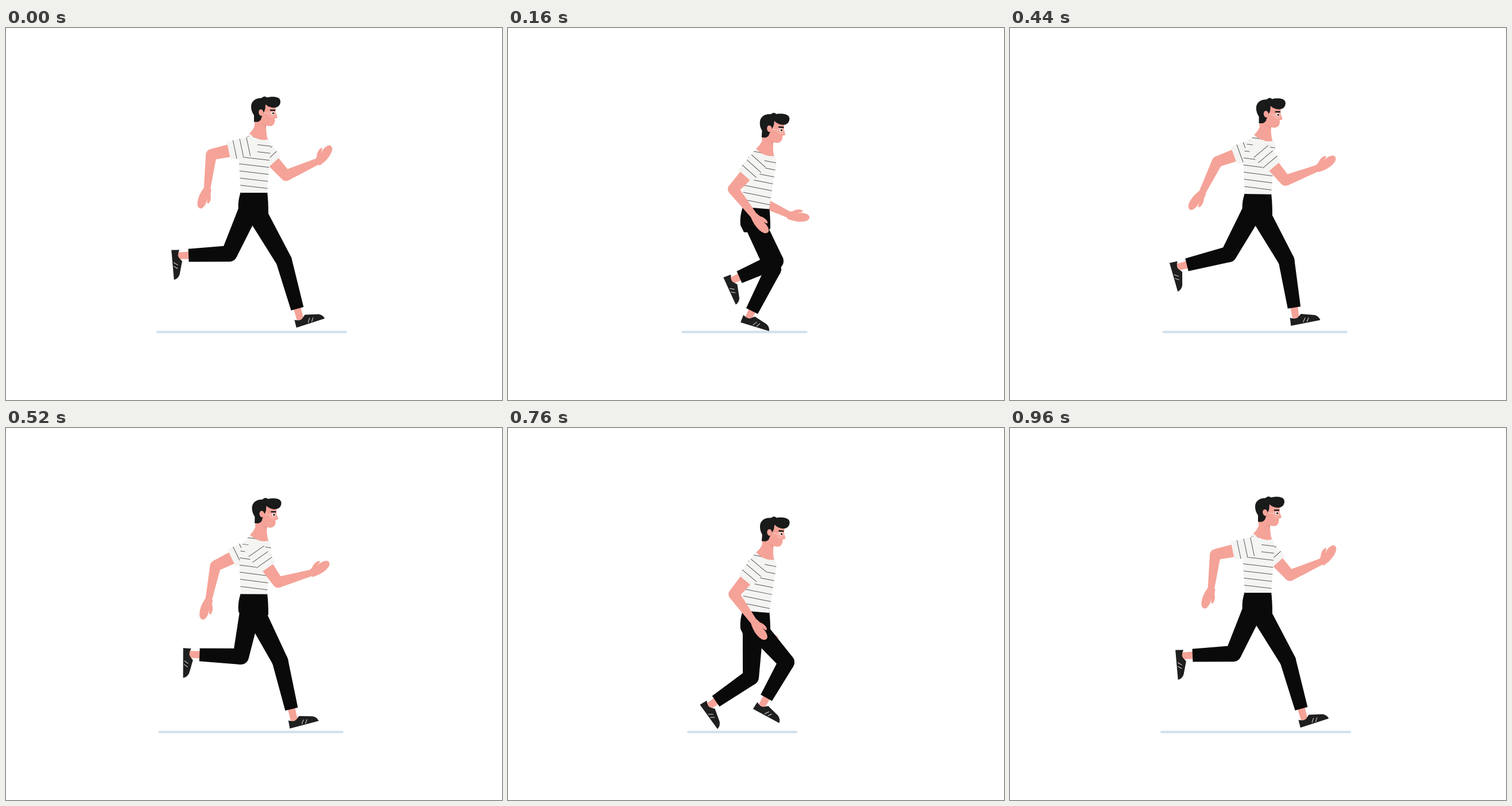
These frames come from a looping animation (864 by 648 pixels, 1 s). An HTML page with a canvas:

```html
<!DOCTYPE html>
<html lang="en">
<head>
<meta charset="utf-8">
<title>Runner</title>
<style>
  html, body { margin: 0; width: 100%; height: 100%; overflow: hidden; background: #fff; }
  canvas { display: block; width: 864px; height: 648px; }
</style>
</head>
<body>
<canvas id="stage"></canvas>
<script>
const W = 864, H = 648, LOOP = 1000, STEP = 40, CYCLE = 960;
const SKIN = '#f5a398', SHADE = '#e08e84', PANTS = '#0a0a0a', HAIR = '#191a1a',
      SHOE = '#1e1f1e', SHIRT = '#f4f4f2', STRIPE = '#55585a', GROUND = '#cfe0ec';

const canvas = document.getElementById('stage');
const ctx = canvas.getContext('2d');
const ratio = window.devicePixelRatio || 1;
canvas.width = W * ratio;
canvas.height = H * ratio;

// time, knee x, knee y, trouser end x, y, foot angle, ankle length
const LEG = [
  [0, 484, 405, 507.5, 489, -18, 19],
  [120, 459, 412, 444.5, 490.5, 8, 18],
  [160, 462, 420, 425, 493, 17, 13],
  [280, 423, 434, 362, 476, 54, 14],
  [320, 408.5, 425, 344.5, 464, 59, 15],
  [440, 381, 394, 308, 412.5, 74, 16],
  [480, 389, 393, 318, 396, 85, 17],
  [600, 457, 410, 385.5, 420.5, 81, 14],
  [640, 466, 406, 403, 434, 65.5, 13.5],
  [760, 485, 408, 450, 470, 28.5, 16],
  [800, 484, 406, 460.5, 475.5, 20, 14],
  [920, 481.5, 405, 495, 487, -11, 18]
];

// time, upper arm angle, upper arm length, forearm angle, hand angle
const NEAR_ARM = [
  [0, 168, 74, 97, 115],
  [160, 132, 66, 52, 53],
  [320, 67, 69, -8, -33],
  [440, 50, 76, -21, -31],
  [600, 71, 72, -1, -20],
  [760, 130, 67, 54, 58]
];
const FAR_ARM = [
  [0, 48, 74, -24, -49],
  [160, 98, 71, 25, 9],
  [320, 152, 79, 95, 107],
  [440, 160, 83, 116, 131],
  [600, 142, 79, 81, 82],
  [760, 105, 69, 70, 40]
];

// time, lean in degrees
const LEAN = [[0, 0], [120, 3.5], [160, 4.5], [280, 4.6], [320, 3.2], [440, 0.7]];

const PELVIS = new Path2D('M409 -2C405 10 404 20 405 30L411 42H440L457 36Q457 14 455 -2Z');
const TORSO = new Path2D('M424 184Q440 196 456 193Q461 199 461 208L458 245L455 287H409L406 237Q406 208 412 199Z');
const NECK = new Path2D('M433 158V171Q430 178 424 184Q439 198 456 194Q453 184 453 168L450 155Z');
const NECK_SHADE = new Path2D('M445 166Q452 171 453 176L453 169Z');
const FACE = new Path2D('M440 135L452 131L470 138L469.500 146L473 155.500Q472 157.500 468 157.500L468.500 162Q467 171 459.500 171Q450 171 444 164Z');
const HAIR_SHAPE = new Path2D('M432 163.500L432 152Q427 145 427 137C427 128 434 122 445 122' +
  'Q450 117 454.500 121C462 119 478 118 478 128C478 137 470 140 463 138.500Q456 137 452 133' +
  'L451.500 141L448 150L445 156Q445 161 439 163.500Z');
const HAND = new Path2D('M-6 -6L2 -8C8 -13 16 -14 19 -11.500C20.500 -9 15 -8 12 -6' +
  'C18 -8.500 26 -8.500 31 -5C34 -2 32 3 28 5C18 10 4 9 -6 6Z');
const SHOE_SHAPE = new Path2D('M0 0L1 -14Q11 -8 16 -13L21 -17L44 -10.500Q51 -7 52 0Z');
const LACES = new Path2D('M27 -9L22 -2M33 -8L28.500 -1.500');

const rad = deg => deg * Math.PI / 180;
const polar = (p, deg, len) => [p[0] + Math.cos(rad(deg)) * len, p[1] + Math.sin(rad(deg)) * len];

// Smooth periodic interpolation through rows of [time, ...values].
function sample(rows, time, period) {
  const n = rows.length;
  const t = ((time % period) + period) % period;
  let i = n - 1;
  while (rows[i][0] > t) i--;
  const at = k => rows[(k + n) % n];
  const when = k => at(k)[0] + Math.floor(k / n) * period;
  const slope = (k, c) => {
    const h0 = when(k) - when(k - 1), h1 = when(k + 1) - when(k);
    const d0 = (at(k)[c] - at(k - 1)[c]) / h0, d1 = (at(k + 1)[c] - at(k)[c]) / h1;
    return (d0 * h1 + d1 * h0) / (h0 + h1);
  };
  const h = when(i + 1) - when(i), u = (t - when(i)) / h, v = 1 - u;
  return rows[0].slice(1).map((_, j) => {
    const c = j + 1;
    return (1 + 2 * u) * v * v * at(i)[c] + u * v * v * h * slope(i, c) +
           u * u * (3 - 2 * u) * at(i + 1)[c] - u * u * v * h * slope(i + 1, c);
  });
}

function fill(path, color) {
  ctx.fillStyle = color;
  ctx.fill(path);
}

function line(x1, y1, x2, y2, color, width) {
  ctx.strokeStyle = color;
  ctx.lineWidth = width;
  ctx.beginPath();
  ctx.moveTo(x1, y1);
  ctx.lineTo(x2, y2);
  ctx.stroke();
}

function dot(x, y, r, color) {
  ctx.fillStyle = color;
  ctx.beginPath();
  ctx.arc(x, y, r, 0, Math.PI * 2);
  ctx.fill();
}

// Tapered piece from a to b, half widths ra and rb.
function limb(a, b, ra, rb, color) {
  const d = Math.hypot(b[0] - a[0], b[1] - a[1]);
  const nx = (a[1] - b[1]) / d, ny = (b[0] - a[0]) / d;
  ctx.fillStyle = color;
  ctx.beginPath();
  ctx.moveTo(a[0] + nx * ra, a[1] + ny * ra);
  ctx.lineTo(b[0] + nx * rb, b[1] + ny * rb);
  ctx.lineTo(b[0] - nx * rb, b[1] - ny * rb);
  ctx.lineTo(a[0] - nx * ra, a[1] - ny * ra);
  ctx.fill();
}

function placed(p, deg, draw) {
  ctx.save();
  ctx.translate(p[0], p[1]);
  ctx.rotate(rad(deg));
  draw();
  ctx.restore();
}

function drawLeg(time, waist) {
  const [kx, ky, cx, cy, foot, len] = sample(LEG, time, CYCLE);
  const knee = [kx, ky], cuff = [cx, cy];
  const hip = [427.5 + 0.1 * (kx - 430), waist + 29];
  const shin = Math.atan2(cy - ky, cx - kx) * 180 / Math.PI;
  const ankle = polar(cuff, shin, len);
  limb(polar(cuff, shin, -5), ankle, 6.5, 6, SKIN);
  dot(ankle[0], ankle[1], 6, SKIN);
  placed(ankle, foot, () => {
    ctx.translate(-11, 12);
    fill(SHOE_SHAPE, SHOE);
    ctx.strokeStyle = '#e6e6e6';
    ctx.lineWidth = 1;
    ctx.stroke(LACES);
  });
  limb(hip, knee, 18, 14, PANTS);
  limb(knee, cuff, 14, 11.3, PANTS);
  dot(hip[0], hip[1], 18, PANTS);
  dot(kx, ky, 14, PANTS);
}

function drawSleeve(len) {
  const end = len - 31;
  ctx.fillStyle = SHIRT;
  ctx.beginPath();
  ctx.moveTo(end, -16);
  ctx.lineTo(0, -17);
  ctx.bezierCurveTo(-11, -14, -11, 14, 0, 17);
  ctx.lineTo(end, 16);
  ctx.fill();
  for (let x = end - 11; x > -2; x -= 12) line(x, -16.5, x, 16.5, STRIPE, 1);
}

function drawArm(rows, time, shoulder) {
  const [upper, len, fore, hand] = sample(rows, time, CYCLE);
  const elbow = polar(shoulder, upper, len);
  const wrist = polar(elbow, fore, 64);
  limb(shoulder, elbow, 13, 9.5, SKIN);
  limb(elbow, wrist, 9.5, 5.5, SKIN);
  dot(elbow[0], elbow[1], 9.5, SKIN);
  dot(wrist[0], wrist[1], 5.5, SKIN);
  placed(wrist, hand, () => fill(HAND, SKIN));
  placed(shoulder, upper, () => drawSleeve(len));
}

function drawTorso() {
  fill(TORSO, SHIRT);
  ctx.save();
  ctx.clip(TORSO);
  for (let i = -1; i < 7; i++) {
    const y = 199.5 + 12.35 * i;
    line(406, y, 462, y + 6.6, STRIPE, 1);
  }
  ctx.restore();
}

function drawHead() {
  fill(NECK, SKIN);
  fill(NECK_SHADE, SHADE);
  fill(FACE, SKIN);
  fill(HAIR_SHAPE, HAIR);
  ctx.fillStyle = SKIN;
  ctx.beginPath();
  ctx.ellipse(444.5, 147.5, 4.3, 5.8, -0.2, 0, Math.PI * 2);
  ctx.fill();
  ctx.strokeStyle = '#f9cfc8';
  ctx.lineWidth = 1;
  ctx.beginPath();
  ctx.arc(463.7, 149.8, 4.8, 0, Math.PI * 2);
  ctx.moveTo(459, 149);
  ctx.lineTo(449, 147.5);
  ctx.stroke();
  dot(464.5, 148.7, 2.8, '#f8e4df');
  dot(465.5, 148.5, 1.6, HAIR);
  line(460, 143.3, 469, 143.2, HAIR, 2.6);
}

function draw(time) {
  const sink = (1 - Math.cos(2 * Math.PI * time / (CYCLE / 2))) / 2;
  const waist = 287 + 35.5 * sink;
  const lean = sample(LEAN, time, CYCLE / 2)[0];
  const onBody = (x, y) => {
    const c = Math.cos(rad(lean)), s = Math.sin(rad(lean));
    const dx = x - 432, dy = y - 287;
    return [432 + dx * c - dy * s, waist + dx * s + dy * c];
  };

  ctx.setTransform(ratio, 0, 0, ratio, 0, 0);
  ctx.fillStyle = '#fff';
  ctx.fillRect(0, 0, W, H);

  ctx.lineCap = 'round';
  line(264 + 53.5 * sink, 529.5, 592 - 96.5 * sink, 529.5, GROUND, 4);
  ctx.lineCap = 'butt';

  drawArm(FAR_ARM, time, onBody(438, 202));
  drawLeg(time + CYCLE / 2, waist);
  drawLeg(time, waist);
  placed([0, waist], 0, () => fill(PELVIS, PANTS));

  placed([432, waist], lean, () => {
    ctx.translate(-432, -287);
    drawTorso();
    drawHead();
  });
  drawArm(NEAR_ARM, time, onBody(430, 205));
}

function tick() {
  const t = performance.now() % LOOP;
  draw(Math.floor(t / STEP) * STEP);
  requestAnimationFrame(tick);
}
tick();
</script>
</body>
</html>
```
